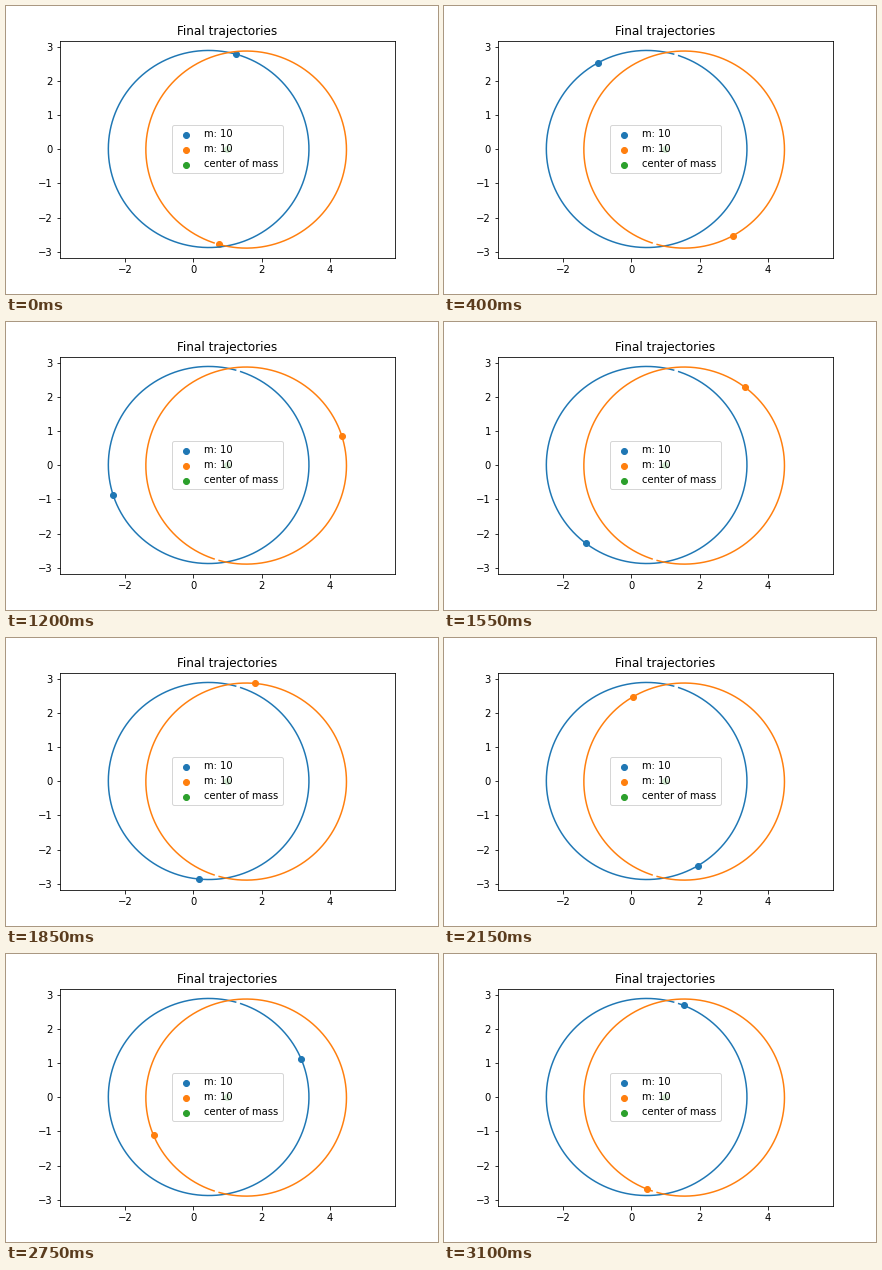
Recreate the animation shown at these times as a matplotlib script. Size 432 by 288 pixels, loop 3.15 s.

```python
import numpy as np
import matplotlib.pyplot as plt
from matplotlib.animation import FuncAnimation

FRAMES = 63
CENTER = np.array([1.0, 0.0])
AXIS, ECC = 2.933, 0.187          # semi-major axis, eccentricity
TILT = np.radians(-0.9)           # direction of periapsis
PHASE = np.radians(64.9)          # mean anomaly at the start
SCALE = 34.2                      # pixels per unit


def orbit(step):
    """Offset from the center of mass on a Kepler ellipse."""
    mean = PHASE + 2 * np.pi * np.asarray(step, dtype=float) / FRAMES
    ecc = mean.copy() if mean.ndim else float(mean)
    for _ in range(8):
        ecc = ecc - (ecc - ECC * np.sin(ecc) - mean) / (1 - ECC * np.cos(ecc))
    u = AXIS * (np.cos(ecc) - ECC)
    v = AXIS * np.sqrt(1 - ECC**2) * np.sin(ecc)
    c, s = np.cos(TILT), np.sin(TILT)
    return np.stack([c * u - s * v, s * u + c * v], axis=-1)


fig, ax = plt.subplots(figsize=(6, 4), dpi=72)
fig.subplots_adjust(left=0.125, right=0.9, bottom=0.125, top=0.88)

# The recorded paths stop half a step short of a full turn.
path = orbit(np.linspace(0, FRAMES - 0.5, 1251))
bodies = []
for sign, color in ((1, "C0"), (-1, "C1")):
    ax.plot(*(CENTER + sign * path).T, color=color, lw=1.5)
    dot = ax.scatter(*(CENTER + sign * path[0]), color=color, label="m: 10")
    bodies.append((sign, dot))
ax.scatter(*CENTER, color="C2", label="center of mass")

half_w, half_h = 167.4 / SCALE, 108.72 / SCALE
ax.set_xlim(CENTER[0] - half_w, CENTER[0] + half_w)
ax.set_ylim(-half_h, half_h)
ax.set_title("Final trajectories")
ax.legend(loc="center")


def update(i):
    offset = orbit(i)
    for sign, dot in bodies:
        dot.set_offsets([CENTER + sign * offset])
    return [dot for _, dot in bodies]


anim = FuncAnimation(fig, update, frames=FRAMES, interval=50, repeat=True,
                     repeat_delay=0, blit=False)
plt.show()
```
